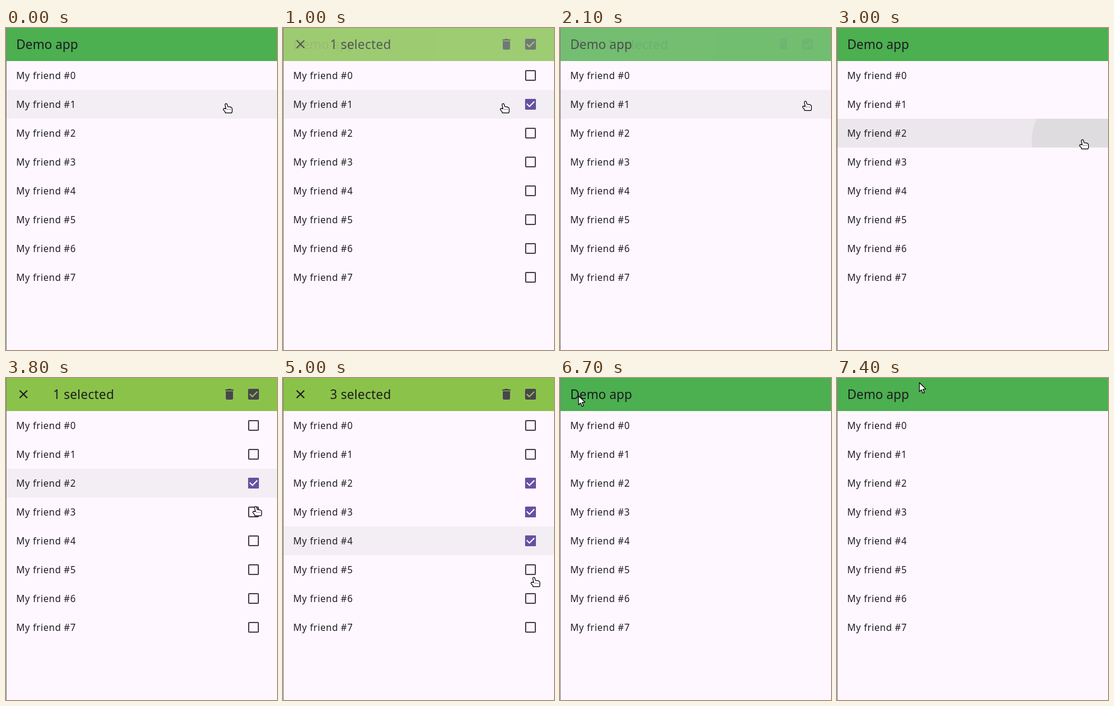
Recreate the animation shown at these times as an HTML page. Size 450x536 px, loop 8000 ms.

```html
<!DOCTYPE html>
<html lang="en">
<head>
<meta charset="utf-8">
<title>Demo app</title>
<style>
  html, body { margin: 0; width: 100%; height: 100%; overflow: hidden; background: #fef7ff; }
  svg { display: block; width: 450px; height: 536px; }
  text { font-family: "Noto Sans", "Open Sans", sans-serif; fill: #1d1b20; white-space: pre; }
  .title { font-size: 21px; }
  .item { font-size: 15.5px; letter-spacing: .55px; }
  .icon { fill: #49454f; }
  .tick { fill: none; stroke: #fff; stroke-width: 2; }
  .frame { fill: none; stroke: #49454f; stroke-width: 2; }
  .cursor { fill: #fff; stroke: #000; stroke-width: 1.2; stroke-linejoin: round; }
</style>
</head>
<body>
<svg viewBox="0 0 450 536">
  <defs><clipPath id="rowClip"><rect id="clipRect" x="1" width="449" height="48"/></clipPath></defs>
  <rect width="450" height="536" fill="#fef7ff"/>
  <rect id="hover" x="1" width="449" height="48" fill="#f3edf4"/>
  <g id="ink" clip-path="url(#rowClip)">
    <rect id="glow" x="1" width="449" height="48" fill="#bcbcbc"/>
    <circle id="splash" fill="#c8c8c8"/>
  </g>
  <circle id="tap" cx="411" r="20" fill="#6750a4" fill-opacity=".1"/>
  <g id="rows"></g>
  <g id="bars">
    <g id="plainBar">
      <rect width="450" height="55" fill="#4caf50"/>
      <text class="title" x="17" y="35">Demo app</text>
    </g>
    <g id="pickBar">
      <rect width="450" height="55" fill="#8bc34a"/>
      <circle id="halo" cx="29" cy="27" r="20" fill="#1d1b20" fill-opacity=".08"/>
      <path d="M22.7 20.7L35.3 33.3M35.3 20.7L22.7 33.3" stroke="#1d1b20" stroke-width="2"/>
      <text id="count" class="title" x="78" y="35" letter-spacing=".25"></text>
      <path class="icon" transform="translate(359 15)" d="M6 19c0 1.1.9 2 2 2h8c1.1 0 2-.9 2-2V7H6zM19 4h-3.5l-1-1h-5l-1 1H5v2h14z"/>
      <rect class="icon" x="402" y="18" width="18" height="18" rx="2"/>
      <path d="M404.7 26.7L409 31L417.3 22.7" fill="none" stroke="#8bc34a" stroke-width="2"/>
    </g>
  </g>
  <rect width="1" height="536" fill="#858387"/>
  <g id="hand" class="cursor">
    <path d="M4.4 1.2Q6.2 .2 7.1 2L8.2 5.8L13 6.6Q15.4 7.2 15.5 9.4V14.6L14.6 16.4H4.2L3.8 14.4L1.2 11.6Q.2 9 2.8 8.9L5.2 9.6L3.8 2.8Q3.7 1.6 4.4 1.2Z"/>
    <path d="M7 10.5H14" fill="none" stroke-width="1" stroke-dasharray="1 1.4"/>
  </g>
  <path id="arrow" class="cursor" d="M.8 .8V15.6L4.2 12.6L6.5 18.2L9 17.1L6.8 11.7L11.6 11.4Z"/>
</svg>
<script>
const $ = id => document.getElementById(id);
const clamp = v => Math.min(1, Math.max(0, v));
const mix = (a, b, k) => a + (b - a) * k;
const easeOut = k => 1 - (1 - k) ** 3;
const rowTop = i => 55 + 48 * i;

const LOOP = 8000, STEP = 100, FADE = 300, HOLD = 400;
const ROWS = 8;

// A long press on a row opens selection mode; later taps add the rows below it
const sessions = [
  { row: 1, start: 800, end: 1880, taps: 0 },
  { row: 2, start: 3330, end: 6350, taps: 3 }
];
const tapTime = n => 3650 + 550 * n;

// Pointer moves: start, duration, end point
const home = [360, 125];
const moves = [
  [1100, 200, 402, 121],
  [2100, 200, 402, 185],
  [3700, 200, 410, 217],
  [4200, 200, 411, 280],
  [4500, 100, 411, 274],
  [4900, 200, 411, 339],
  [5100, 100, 411, 329],
  [5400, 800, 30, 29],
  [6700, 300, 137, 4],
  [7100, 300, 136, 7]
];

$('rows').innerHTML = Array.from({ length: ROWS }, (_, i) => `
  <g transform="translate(0 ${rowTop(i)})">
    <text class="item" x="17" y="30">My friend #${i}</text>
    <g id="box${i}">
      <rect class="frame" x="403" y="16" width="16" height="16" rx="1"/>
      <g id="tick${i}">
        <rect x="402" y="15" width="18" height="18" rx="2" fill="#6750a4"/>
        <path class="tick" d="M404.7 23.1L409.2 27.6L417.3 19.5"/>
      </g>
    </g>
  </g>`).join('');

function pointer(t) {
  let [x, y] = home;
  for (const [start, length, toX, toY] of moves) {
    const k = easeOut(clamp((t - start) / length));
    x = mix(x, toX, k);
    y = mix(y, toY, k);
  }
  return [x, y];
}

// cubic-bezier(.25, .1, .25, 1)
function ease(x) {
  const curve = (a, b, s) => 3 * a * s * (1 - s) ** 2 + 3 * b * s * s * (1 - s) + s ** 3;
  let lo = 0, hi = 1;
  for (let i = 0; i < 24; i++) {
    const mid = (lo + hi) / 2;
    if (curve(.25, .25, mid) < x) lo = mid; else hi = mid;
  }
  return curve(.1, 1, lo);
}

function show(id, on) {
  $(id).style.display = on ? '' : 'none';
}

function set(id, attrs) {
  for (const name in attrs) $(id).setAttribute(name, attrs[name]);
}

function drawInk(t) {
  const held = sessions.find(s => t > s.start - HOLD && t < s.start);
  show('ink', held);
  if (!held) return;
  const age = t - held.start + HOLD, k = ease(age / 1000);
  const [x, y] = pointer(t), top = rowTop(held.row);
  const reach = Math.hypot(449, 48) / 2;
  set('clipRect', { y: top });
  set('glow', { y: top, 'fill-opacity': .4 * clamp(age / 200) });
  set('splash', {
    cx: mix(x + 8, 225.5, k), cy: mix(y + 2, top + 24, k),
    r: mix(.3 * reach, reach + 5, k), 'fill-opacity': .4 * clamp(age / 75)
  });
}

function drawBars(t, picking) {
  const switches = sessions.flatMap(s => [s.start, s.end]);
  const since = Math.max(-FADE, ...switches.filter(s => s <= t));
  const k = clamp((t - since) / FADE);
  const [next, prev] = picking ? ['pickBar', 'plainBar'] : ['plainBar', 'pickBar'];
  if ($('bars').lastElementChild !== $(next)) $('bars').append($(next));
  set(next, { opacity: k });
  set(prev, { opacity: 1 - k });
}

function drawRows(t, session, picking) {
  let taps = 0;
  while (taps < session.taps && t >= tapTime(taps + 1)) taps++;
  for (let i = 0; i < ROWS; i++) {
    show('box' + i, picking);
    show('tick' + i, i >= session.row && i <= session.row + taps);
  }
  $('count').textContent = `${1 + taps} selected`;
  const tapped = taps > 0 && t < tapTime(taps) + 200;
  show('tap', tapped);
  if (tapped) set('tap', { cy: rowTop(session.row + taps) + 24 });
}

function drawPointer(t, picking) {
  const [x, y] = pointer(t);
  // Hover follows the pointer one step late
  const [hx, hy] = pointer(t - STEP);
  const row = Math.floor((hy + 1 - rowTop(0)) / 48);
  const onRow = row >= 0 && row < ROWS;
  const onClose = Math.hypot(hx + 5 - 29, hy + 1 - 27) < 20;
  show('hover', onRow);
  if (onRow) set('hover', { y: rowTop(row) });
  show('halo', onClose);
  const hand = onRow || (onClose && picking);
  show('hand', hand);
  show('arrow', !hand);
  set(hand ? 'hand' : 'arrow', { transform: `translate(${Math.round(x)} ${Math.round(y)})` });
}

function draw(now) {
  const t = Math.floor((now % LOOP) / STEP) * STEP;
  const session = sessions.filter(s => s.start <= t).pop() || sessions[0];
  const picking = t >= session.start && t < session.end;
  drawBars(t, picking);
  drawInk(t);
  drawRows(t, session, picking);
  drawPointer(t, picking);
}

const begin = performance.now();

function run() {
  draw(performance.now() - begin);
  requestAnimationFrame(run);
}

run();
</script>
</body>
</html>
```
